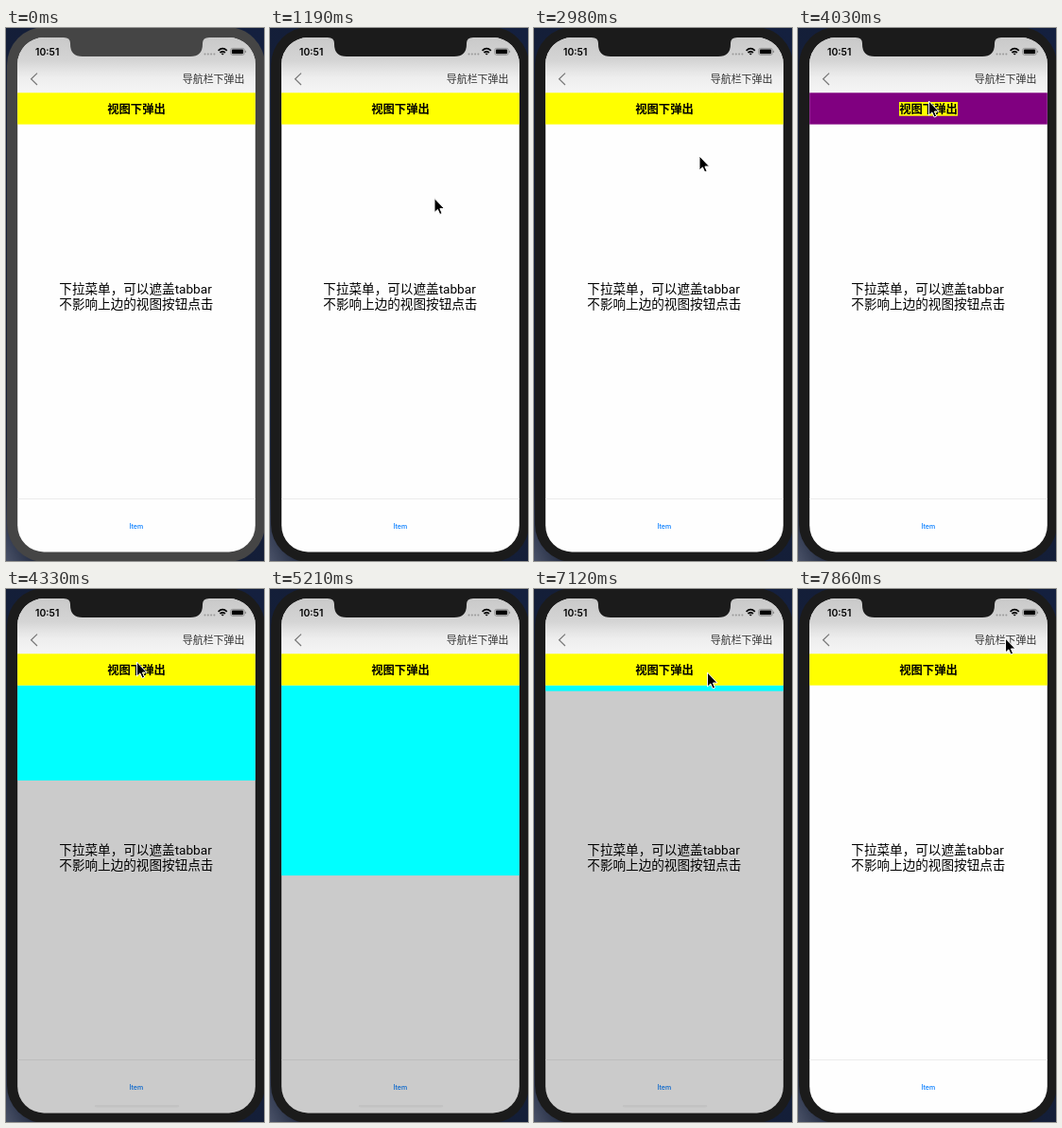
These frames come from a looping animation (273x562 px, 8 s). An HTML page:

```html
<!DOCTYPE html>
<html lang="zh-CN">
<head>
<meta charset="utf-8">
<style>
html, body { margin: 0; width: 100%; height: 100%; overflow: hidden; background: #141d33; }
svg { display: block; width: 273px; height: 562px; }
text { font-family: Inter, "Noto Sans CJK SC", "Noto Sans CJK", sans-serif; }
.body { font-family: Roboto, "Noto Sans CJK SC", "Noto Sans CJK", sans-serif; font-size: 13.6px; }
</style>
</head>
<body>
<svg viewBox="0 0 273 562">
  <defs>
    <linearGradient id="desk" x1="0" y1="1" x2="1" y2="0">
      <stop stop-color="#4a5268"/><stop offset=".08" stop-color="#141d33"/>
      <stop offset="1" stop-color="#14203f"/>
    </linearGradient>
    <linearGradient id="nav" x2="0" y2="1">
      <stop stop-color="#c9c9c9"/><stop offset=".42" stop-color="#d5d5d5"/>
      <stop offset=".56" stop-color="#e2e2e2"/><stop offset=".72" stop-color="#eee"/>
      <stop offset="1" stop-color="#f5f5f5"/>
    </linearGradient>
    <clipPath id="screen"><rect x="12.2" y="10" width="251.6" height="542.5" rx="28"/></clipPath>
  </defs>
  <rect width="273" height="562" fill="url(#desk)"/>
  <rect id="bezel" x="1" y="-1" width="273" height="564" rx="40"/>

  <g clip-path="url(#screen)">
    <rect x="12" y="10" width="252" height="543" fill="#fefefe"/>
    <rect x="12" y="10" width="252" height="59" fill="url(#nav)"/>
    <text class="body" x="56.3" y="279.8">下拉菜单，可以遮盖tabbar</text>
    <text class="body" x="56.3" y="295.8">不影响上边的视图按钮点击</text>
    <path d="M12 496.5H264" stroke="#ececec"/>
    <text x="137.8" y="527.7" font-size="7" font-weight="500" text-anchor="middle" fill="#007aff">Item</text>
    <g id="menu">
      <rect x="12" y="101.6" width="252" height="451" fill-opacity=".2"/>
      <rect x="94" y="544" width="89" height="2.6" rx="1.3" fill="#c2c2c2"/>
      <rect id="panel" x="12" y="101.6" width="252" fill="#0ff"/>
    </g>
    <rect id="head" x="12" y="68.3" width="252" height="33.3"/>
    <rect x="107" y="78" width="62" height="14.7" fill="#ff0"/>
    <text x="138" y="89.7" font-size="12.3" font-weight="600" text-anchor="middle">视图下弹出</text>
  </g>

  <path id="notch" d="M61 9H215V10Q208 10 208 16V17Q208 30 195 30H81Q68 30 68 17V16Q68 10 61 10Z"/>
  <text x="31" y="28.6" font-size="10.4" font-weight="600">10:51</text>
  <path d="M210.5 27.5H222" stroke="#999" stroke-width="2" stroke-linecap="round" stroke-dasharray="0 3.3"/>
  <g fill="none" stroke="#000" stroke-width="1.7">
    <path d="M224.6 23.8Q229.2 19.6 233.8 23.8M226.5 26Q229.2 23.6 231.9 26"/>
    <path d="M229.2 28.6L227.8 27.2Q229.2 26 230.6 27.2Z" fill="#000" stroke="none"/>
    <rect x="237.7" y="21.4" width="14.6" height="7" rx="2" stroke="#888" stroke-width=".8"/>
    <rect x="238.9" y="22.6" width="12.2" height="4.6" rx="1" fill="#000" stroke="none"/>
    <path d="M253.6 23.8V26" stroke="#888" stroke-width="1"/>
    <path d="M33 47.6L26.6 53.8L33 60" stroke="#777" stroke-width="1.2"/>
  </g>
  <text x="186.8" y="57.7" font-size="10.95" fill="#333">导航栏下弹出</text>
  <path id="cursor" d="M0 0V15L3.4 11.9L5.7 17L8.1 16L5.9 11H10.6Z" stroke="#fff" stroke-width="1" stroke-linejoin="round"/>
</svg>
<script>
const LOOP = 8000, TICK = 148.2, LEAD = 5, FULL = 200.5;
const $ = id => document.getElementById(id);
const set = (id, name, value) => $(id).setAttribute(name, value);
const show = (id, on) => set(id, "visibility", on ? "visible" : "hidden");

const within = (n, first, last) => n >= first && n <= last;
const ease = (n, from, to) => {
  const p = Math.min(1, Math.max(0, (n - from) / (to - from)));
  return p * p * (3 - 2 * p);
};

// Pointer glides: from, to, end x, end y
const glides = [
  [4, 5, 174, 179.5], [11, 14, 103.5, 62.5], [18, 20, 175, 135],
  [23, 24, 143, 73.5], [25, 26, 138.5, 77], [31, 34, 164, 88],
  [38, 42, 185, 155], [42, 46, 183.5, 88], [49, 53, 219.5, 52]
];

function pointer(n) {
  let x = 161, y = 179.5;
  for (const [from, to, endX, endY] of glides) {
    const p = ease(n, from, to);
    x += (endX - x) * p;
    y += (endY - y) * p;
  }
  return `translate(${x} ${y})`;
}

function draw(now) {
  const n = Math.floor((now % LOOP + LEAD) / TICK);
  const shell = n < 8 ? "#454545" : "#1b1b1b";
  set("bezel", "fill", shell);
  set("notch", "fill", shell);

  const pressed = within(n, 27, 28) || n === 46;
  set("head", "fill", pressed ? "#800080" : "#ff0");

  const open = ease(n, 28.3, 29.7) - ease(n, 46.2, 48);
  set("panel", "height", FULL * Math.max(open, .03));
  show("menu", within(n, 29, 48));

  show("cursor", n >= 4 && !within(n, 35, 38));
  set("cursor", "transform", pointer(n));
  requestAnimationFrame(draw);
}
requestAnimationFrame(draw);
</script>
</body>
</html>
```
